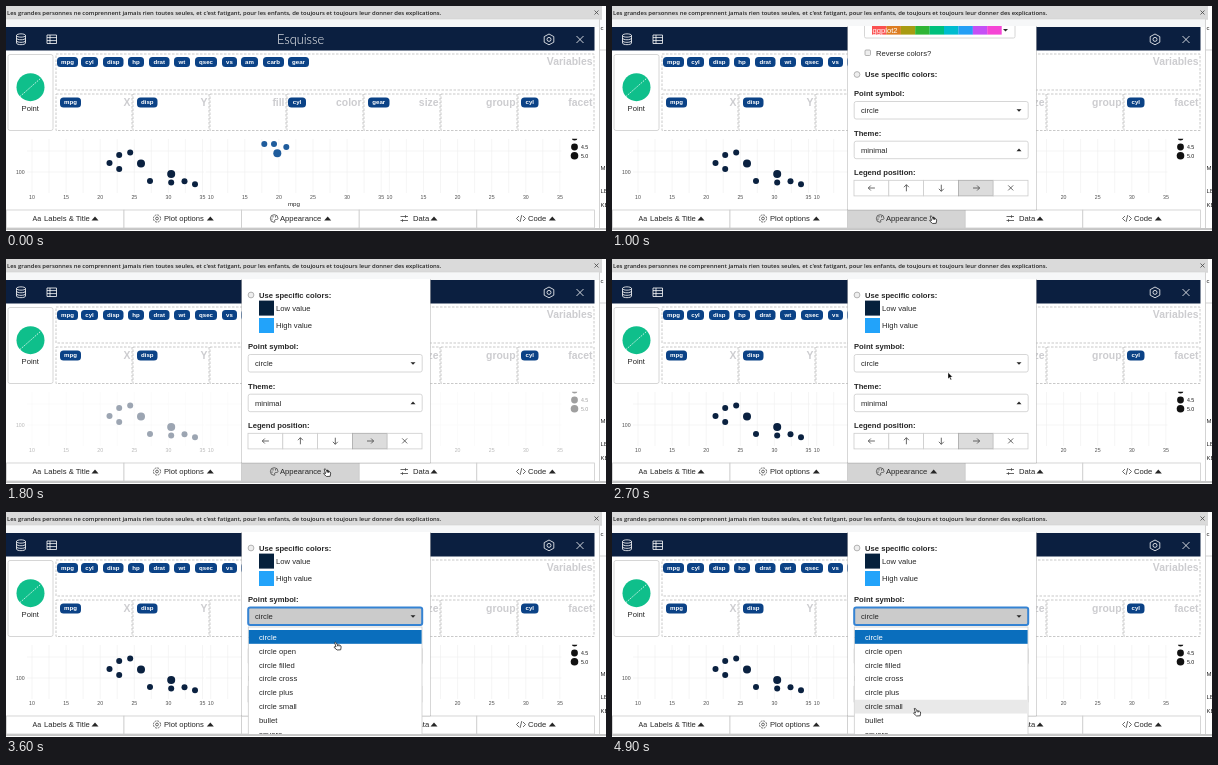
An HTML page for the animation above (5 s loop, 600 by 225 pixels).

```html
<!DOCTYPE html>
<html lang="fr">
<head>
<meta charset="utf-8">
<style>
  html, body { margin: 0; width: 100%; height: 100%; overflow: hidden; background: #fff; }
  svg { display: block; width: 600px; height: 225px; font: 7.65px "Liberation Sans", Arial, sans-serif; fill: #262626; }
  .b { font-weight: bold; }
  .zone { fill: #fff; stroke: #bcbcbc; stroke-width: .8; stroke-dasharray: 2.5 1.5; }
  .zoneLabel { font-size: 10.4px; font-weight: bold; fill: #cdcdd0; text-anchor: end; }
  .tag { font-size: 6.1px; font-weight: bold; fill: #fff; text-anchor: middle; }
  .tick { font-size: 5.2px; fill: #4d4d4d; text-anchor: middle; }
  .line { fill: none; stroke: #444; stroke-width: .8; }
  .white { stroke: #fff; }
  .box { fill: #fff; stroke: #ccc; stroke-width: .8; }
</style>
</head>
<body>
<svg id="stage" viewBox="0 0 600 225"></svg>
<script>
const text = (x, y, s, cls = '', extra = '') => `<text x="${x}" y="${y}" class="${cls}" ${extra}>${s}</text>`;
const rect = (x, y, w, h, attrs) => `<rect x="${x}" y="${y}" width="${w}" height="${h}" ${attrs}/>`;
const dot = (x, y, r, attrs = '') => `<circle cx="${x}" cy="${y}" r="${r}" ${attrs}/>`;
const path = (d, cls = 'line', extra = '') => `<path d="${d}" class="${cls}" ${extra}/>`;
const group = (id, body, extra = '') => `<g id="${id}" ${extra}>${body}</g>`;
const caret = (x, y, tip, half = 2.5) => path(`M${x - half} ${y}h${2 * half}l${-half} ${tip}z`, '');
const tag = (s, x, y, w) => rect(x, y, w, 10, 'rx="3.5" fill="#0b4286"') + text(x + w / 2, y + 7, s, 'tag');
const range = n => [...Array(n).keys()];

function chrome() {
  return rect(0, 0, 600, 225, 'fill="#fff"')
    + rect(0, 0, 596, 12.5, 'fill="#dadada"') + rect(0, 12.5, 596, 1, 'fill="#c4c4c4"')
    + rect(0, 13.5, 593, 7.5, 'fill="#f6f7f8"')
    + text(1, 9, "Les grandes personnes ne comprennent jamais rien toutes seules, et c'est fatigant, pour les enfants, de toujours et toujours leur donner des explications.",
        '', 'style="font:600 5.9px \'Open Sans\',sans-serif" fill="#222"')
    + path('M588.5 4.5l4 4m0-4l-4 4')
    + rect(0, 21, 588.5, 23.5, 'fill="#0b1f40"')
    + text(294.5, 38, 'Esquisse', '', 'style="font:300 12.8px Lato,sans-serif" fill="#fff" text-anchor="middle"')
    + path('M10.5 29.5v7.5c0 2.2 9 2.2 9 0v-7.5c0-2.2-9-2.2-9 0c0 2.2 9 2.2 9 0m-9 2.6c0 2.2 9 2.2 9 0m-9 2.6c0 2.2 9 2.2 9 0', 'line white')
    + path('M41 29h9.5v8.5h-9.5zm0 2.6h9.5m-9.5 3h9.5m-6.5-5.6v8.5', 'line white')
    + path('M543 28l4.8 2.6v5.6l-4.8 2.6l-4.8-2.6v-5.6z', 'line white') + dot(543, 33.4, 2, 'class="line white"')
    + path('M570.5 30l7 7m0-7l-7 7', 'line white')
    + path('M593.5 13.5V222M593.5 44h6.5', 'line', 'style="stroke:#c8c8c8"')
    + [['c', 24], ['MF', 164], ['LB', 187], ['KB', 201]].map(([s, y]) => text(594.5, y, s, '', 'font-size="6"')).join('')
    + rect(0, 222.3, 600, 1.4, 'fill="#adadad"');
}

function variables() {
  const names = 'mpg cyl disp hp drat wt qsec vs am carb gear'.split(' ');
  const lefts = [51, 75, 97, 122, 143, 168, 189, 216, 235, 257, 282];
  const widths = [21, 17, 20.5, 16, 20.5, 16, 22, 15, 17, 21, 21];
  const zones = ['X', 'Y', 'fill', 'color', 'size', 'group', 'facet'];
  return rect(2, 48.5, 45, 76, 'rx="2" class="box"')
    + dot(24.5, 81.2, 14, 'fill="#0fbf8b"')
    + path('M14 90.5L35 72', 'line white', 'stroke-dasharray="1.6 1.2"')
    + text(24.3, 104.5, 'Point', '', 'text-anchor="middle"')
    + rect(50, 48, 538, 36, 'class="zone"') + text(586.5, 59, 'Variables', 'zoneLabel')
    + names.map((s, i) => tag(s, lefts[i], 51, widths[i])).join('')
    + zones.map((s, i) => rect(50 + 77 * i, 88, 76, 36.5, 'class="zone"')
        + text(124.5 + 77 * i, 99.5, s, 'zoneLabel')).join('')
    + tag('mpg', 54, 91.4, 21) + tag('disp', 131, 91.4, 20.5) + tag('cyl', 282, 91.4, 18)
    + tag('gear', 362, 91.4, 21.5) + tag('cyl', 515, 91.4, 17.5);
}

function plot() {
  const fours = [[103.5, 157], [113.2, 149], [113.2, 163], [124.2, 146.5], [135, 157.5, 4], [144, 175],
    [165.2, 168, 4], [165.2, 176.5], [178.5, 175.2], [189, 178.2]];
  const sixes = [[258.3, 138], [268, 138], [280.3, 141], [271.3, 147.3, 4]];
  const dots = (points, color) => points.map(([x, y, r = 3]) => dot(x, y, r, `fill="${color}"`)).join('');
  let grid = '', ticks = '';
  for (const panel of range(3)) {
    const left = 26 + 178.7 * panel;
    grid += `M${left - 5} 166h177m-177-21h177`;
    for (const i of range(6)) {
      const x = left + 34.1 * i;
      grid += `M${x} 133v54` + (i < 5 ? `m17-54v54` : '');
      ticks += text(x, 192.7, 10 + 5 * i, 'tick');
    }
  }
  return path(grid, 'line', 'style="stroke:#eee;stroke-width:.6"') + ticks
    + text(14.3, 168, '100', 'tick') + text(288, 200, 'mpg', '', 'font-size="6.2" text-anchor="middle"')
    + dots(fours, '#0a2140') + dots(sixes, '#1f5c9c')
    + path('M565.9 132.8h5.4a2.7 1.6 0 0 1-5.4 0', '', 'fill="#111"')
    + dot(568.5, 141, 3.4, 'fill="#111"') + dot(568.5, 149.8, 3.8, 'fill="#111"')
    + text(578.5, 142.8, '4.5', 'tick', 'style="fill:#111"') + text(578.5, 151.6, '5.0', 'tick', 'style="fill:#111"');
}

function footer() {
  const labels = [['Labels &amp; Title', 38, 89], ['Plot options', 158, 204.3], ['Appearance', 274, 321.7], ['Data', 407, 428], ['Code', 522, 546.3]];
  return labels.map(([s, x, arrow], i) =>
      rect(.4 + 117.6 * i, 204, 117.6, 18, `class="box" ${i == 2 ? 'id="appearance"' : ''}`)
      + text(x, 215.3, s) + caret(arrow, 214.4, -4, 3.5)).join('')
    + text(26.5, 215, 'Aa', '', 'font-size="7"')
    + dot(151, 212.5, 3.6, 'class="line" stroke-dasharray="1.9 .9"') + dot(151, 212.5, 1.4, 'class="line"')
    + path('M268 216.3a3.8 3.8 0 1 1 4-3.8c0 1.8-3.2.4-3.4 1.6c-.1 1 .8 2.2-.6 2.2z')
    + [[266, 213], [267, 210.8], [269.5, 210.8]].map(([x, y]) => dot(x, y, .6)).join('')
    + path('M394.5 210.5h7.5m-7.5 4h7.5m-5.5-1.3v2.6m3-6.6v2.6')
    + path('M513 210l-2.5 2.5l2.5 2.5m4-5l2.5 2.5l-2.5 2.5m-1.2-6l-1.8 7');
}

function panel() {
  const rainbow = ['#fb5050', '#dd7d22', '#a89b12', '#2fb535', '#00c07c', '#00bccf', '#259ff5', '#c550f5', '#f545d5'];
  const radio = y => dot(245, y, 2.9, 'fill="#eee" stroke="#999" stroke-width=".7"')
    + text(253, y + 2.7, 'Use specific colors:', 'b');
  const cell = i => 242 + 34.8 * i;
  const palette = path('M252.5 20v10.5q0 1.5 1.5 1.5h147.5q1.5 0 1.5-1.5v-10.5', 'box')
    + rainbow.map((c, i) => rect(260 + 14.4 * i, 20, 14.5, 8.6, `fill="${c}"`)).join('')
    + text(260.5, 26.5, 'ggplot2', '', 'style="fill:#fff"') + caret(393.5, 23, 2.6)
    + rect(253, 44, 5.5, 5.5, 'rx="1" fill="#eee" stroke="#999" stroke-width=".7"')
    + text(264, 49.7, 'Reverse colors?') + radio(68.5);
  const specific = radio(36)
    + group('swatches', rect(253, 41.6, 15, 15, 'fill="#05203c"') + rect(253, 59, 15, 15, 'fill="#22a3fa"'))
    + text(270, 51.5, 'Low value') + text(270, 69.2, 'High value');
  return path('M235.5 20v184h189v-184', '', 'fill="#fff" stroke="#000" stroke-opacity=".2" stroke-width=".8"')
    + group('palette', palette) + group('specific', specific)
    + text(242, 89.7, 'Point symbol:', 'b') + rect(242.2, 95.5, 174, 17.5, 'rx="2" id="symbol" class="box"')
    + text(249, 107, 'circle') + caret(407, 103.2, 2.6)
    + text(242, 129.5, 'Theme:', 'b') + rect(242.2, 135.2, 174, 17.5, 'rx="2" class="box"')
    + text(249, 146.7, 'minimal') + caret(407, 145.2, -2.6)
    + text(242, 169.2, 'Legend position:', 'b')
    + range(5).map(i => rect(cell(i), 174.3, 34.8, 15.6, `class="box" ${i == 3 ? 'style="fill:#dcdcdc;stroke:#aaa"' : ''}`)).join('')
    + path('M262.9 182h-6.6m2.5-2.5l-2.5 2.5l2.5 2.5M294.4 185.3v-6.6m-2.5 2.5l2.5-2.5l2.5 2.5M329.3 178.7v6.6m-2.5-2.5l2.5 2.5l2.5-2.5M361 182h6.6m-2.5-2.5l2.5 2.5l-2.5 2.5M396.2 179.4l5 5m0-5l-5 5');
}

const rowTop = i => 118 + 13.95 * i;
function dropdown() {
  const items = ['circle', 'circle open', 'circle filled', 'circle cross', 'circle plus', 'circle small', 'bullet', 'square'];
  return rect(242.3, 115, 173.7, 112, 'class="box"')
    + rect(242.8, rowTop(0), 172.8, 13.8, 'fill="#0a6ebd"')
    + rect(242.8, 0, 172.8, 13.8, 'id="hover" fill="#e9e9e9"')
    + items.map((s, i) => text(253, rowTop(i) + 9.6, s, '', i ? '' : 'style="fill:#fff"')).join('');
}

const stage = document.getElementById('stage');
stage.innerHTML = `<clipPath id="window">${rect(0, 0, 600, 222, '')}</clipPath>`
  + chrome() + variables() + group('plot', plot()) + footer() + group('panel', panel())
  + group('dropdown', dropdown(), 'clip-path="url(#window)"')
  + group('hand', path('M-2.8-3.4q.9-.8 1.6.3l1 1.8l2.6.5q1.4.5 1.2 1.9l-.4 2.7l-3.6.2l-2.9-2.5q-.2-1.1 1-.8l.8.3zM-.2-1.1l.5 1.4m1-1.1l.4 1.2', '', 'fill="#fff" stroke="#222" stroke-width=".8"'))
  + group('arrow', path('M0-3.6v6.4l1.5-1.3l1.1 2.4l1-.5l-1.1-2.3h2z', '', 'fill="#000" stroke="#fff" stroke-width=".4"'));

const $ = id => document.getElementById(id);
const show = (id, on) => $(id).setAttribute('visibility', on ? 'inherit' : 'hidden');

// Piecewise linear value at time t from [time, value] pairs.
function ramp(t, keys) {
  const next = keys.findIndex(k => k[0] > t);
  if (next < 0) return keys[keys.length - 1][1];
  if (next == 0) return keys[0][1];
  const [[t0, a], [t1, b]] = [keys[next - 1], keys[next]];
  return a + (b - a) * (t - t0) / (t1 - t0);
}

const cursorX = [[100, 345], [600, 321], [2000, 321], [2300, 345], [2600, 336], [2700, 336], [3000, 345], [3300, 345], [3700, 327], [4400, 327], [4900, 305]];
const cursorY = [[100, 224], [600, 213.5], [2000, 213.5], [2600, 117], [2700, 117], [3000, 110], [3300, 110], [3700, 142], [4400, 142], [4900, 200]];
const plotOpacity = [[1500, 1], [1800, .4], [1900, 1], [3850, 1], [4100, .55], [4300, .3], [4400, 1]];

function draw(now) {
  const t = Math.floor(now % 5000 / 100) * 100;
  const x = ramp(t, cursorX), y = ramp(t, cursorY);
  const pointing = t >= 2200 && t < 2900;
  const focused = t >= 3200;

  show('panel', t >= 700);
  show('palette', t < 1200);
  show('specific', t >= 1200);
  $('swatches').setAttribute('opacity', ramp(t, [[1200, 0], [1400, 1]]));
  $('plot').setAttribute('opacity', ramp(t, plotOpacity));
  $('appearance').style.fill = focused || t < 300 ? '#fff' : t >= 700 ? '#d4d4d4' : '#e6e6e6';

  const symbol = $('symbol').style;
  symbol.fill = focused ? '#cbcbcb' : t >= 2900 ? '#e6e6e6' : '#fff';
  symbol.stroke = focused ? '#3583d3' : '#ccc';
  symbol.strokeWidth = focused ? 2 : .8;

  show('dropdown', t >= 3300);
  const row = Math.floor((y - 3 - rowTop(0)) / 13.95);
  show('hover', t >= 4400 && row > 0);
  $('hover').setAttribute('y', rowTop(row));

  for (const id of ['hand', 'arrow']) $(id).setAttribute('transform', `translate(${x} ${y})`);
  show('hand', t >= 100 && !pointing);
  show('arrow', pointing);
}

const start = performance.now();
function loop() {
  draw(performance.now() - start);
  requestAnimationFrame(loop);
}
loop();
</script>
</body>
</html>
```
